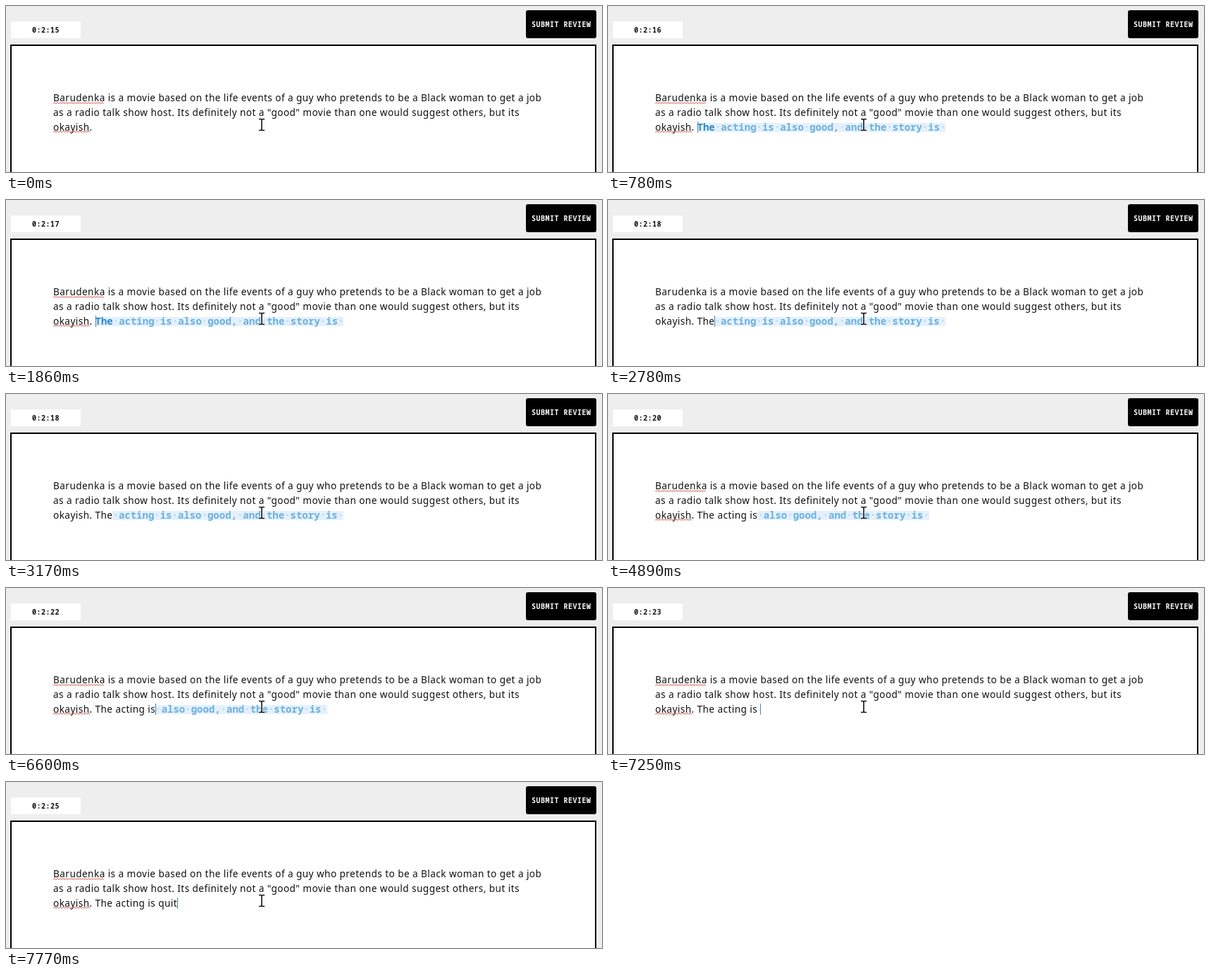
An HTML page that plays this animation: 846 px wide and 237 px high, repeating every 8000 ms.

```html
<!DOCTYPE html>
<html lang="en">
<head>
<meta charset="utf-8">
<title>Review editor</title>
<style>
  html, body { margin: 0; width: 100%; height: 100%; overflow: hidden; }
  #stage { position: relative; width: 846px; height: 237px; overflow: hidden; background: #eee; color: #111; }
  #stage > * { position: absolute; box-sizing: border-box; margin: 0; white-space: pre; }
  .mono { font: 600 10px/24px "Noto Sans Mono", monospace; letter-spacing: .5px; }
  #timer { left: 7px; top: 22px; width: 99px; height: 24px; padding-left: 30px; background: #fff; }
  #submit { left: 738px; top: 6px; width: 100px; height: 40px; padding-left: 8px; line-height: 40px; border-radius: 3px; background: #000; color: #fff; }
  #page { left: 6px; top: 55px; width: 832px; height: 200px; border: 2px solid #000; background: #fff; }
  #text { left: 67px; top: 120px; font: 13.6px/21px "Noto Sans", sans-serif; letter-spacing: .434px; }
  #hint {
    font: 600 14px/1 "Noto Sans Mono", monospace; letter-spacing: 0; color: #6bb0df;
    background: linear-gradient(#e4f1fc, #e4f1fc) 0 4px / 100% 13px no-repeat;
  }
  #hint b { font-weight: 700; color: #2b87c9; }
  #hint i { font-style: normal; color: #b4d8f2; }
  #caret { position: relative; }
  #caret::before { content: ""; position: absolute; left: 0; top: 2px; width: 1px; height: 16px; background: #4f7cb4; }
  svg { left: 0; top: 0; width: 846px; height: 237px; fill: none; }
</style>
</head>
<body>
<div id="stage">
  <div id="timer" class="mono"></div>
  <div id="submit" class="mono">SUBMIT REVIEW</div>
  <div id="page"></div>
  <p id="text">Barudenka is a movie based on the life events of a guy who pretends to be a Black woman to get a job
as a radio talk show host. Its definitely not a "good" movie than one would suggest others, but its
okayish.<span id="typed"></span><span id="caret"></span><span id="hint"></span></p>
  <svg viewBox="0 0 846 237">
    <path id="waves" stroke="#d2524b"/>
    <g id="pointer">
      <path d="M359 161.5H367M359 177.5H367M363 161V178" stroke="#fff" stroke-width="3.5"/>
      <path d="M359 161.5H362L363 162.5L364 161.5H367M359 177.5H362L363 176.5L364 177.5H367M363 162V177" stroke="#111" stroke-width="1.6"/>
    </g>
  </svg>
</div>
<script>
const LOOP = 8000;
const $ = id => document.getElementById(id);

// Each track is a list of [start ms, value].
const seconds = [[0, 15], [520, 16], [1730, 17], [2650, 18], [3560, 19], [4480, 20],
  [5540, 21], [6600, 22], [7250, 23], [7510, 24], [7770, 25]];
const typed = [[0, ""], [520, " "], [2520, " The"], [3430, " The acting"], [4350, " The acting is"],
  [7250, " The acting is "], [7380, " The acting is q"], [7510, " The acting is qu"],
  [7640, " The acting is qui"], [7770, " The acting is quit"]];
const hint = [[0, ""], [520, "The acting is also good, and the story is "],
  [2520, " acting is also good, and the story is "],
  [3430, " is also good, and the story is "],
  [4350, " also good, and the story is "], [7250, ""]];
const caret = [[0, 0], [520, 1], [1050, 0], [1470, 1], [2000, 0], [2520, 1], [3040, 0],
  [4210, 1], [4480, 0], [5140, 1], [5540, 0], [5930, 1], [6330, 0], [6600, 1], [6860, 0], [7250, 1]];
const spelling = [[0, 1], [2780, 0], [3430, 1]];

const at = (track, t) => track.findLast(step => step[0] <= t)[1];

function wave(x, end, y) {
  let d = `M${x} ${y}`;
  for (let k = 1; x + 2 * k <= end; k++) d += `L${x + 2 * k} ${y + (k % 2 ? -1.6 : 0)}`;
  return d;
}

const markHint = s => s.replace(/^The/, "#").replace(/ /g, "<i>·</i>").replace("#", "<b>The</b>");

$("waves").setAttribute("d", wave(67, 140, 139.3) + wave(67, 119, 180.3));

let shown = "";
function draw(now) {
  const t = now % LOOP;
  const state = [seconds, typed, hint, caret, spelling].map(track => at(track, t));
  const key = state.join("|");
  if (key !== shown) {
    shown = key;
    const [sec, words, ghost, bar, marks] = state;
    $("timer").textContent = "0:2:" + sec;
    $("typed").textContent = words;
    $("hint").innerHTML = markHint(ghost);
    $("caret").style.visibility = bar ? "visible" : "hidden";
    $("waves").style.visibility = marks ? "visible" : "hidden";
  }
}

const start = performance.now();
function tick() {
  draw(performance.now() - start);
  requestAnimationFrame(tick);
}
tick();
</script>
</body>
</html>
```
